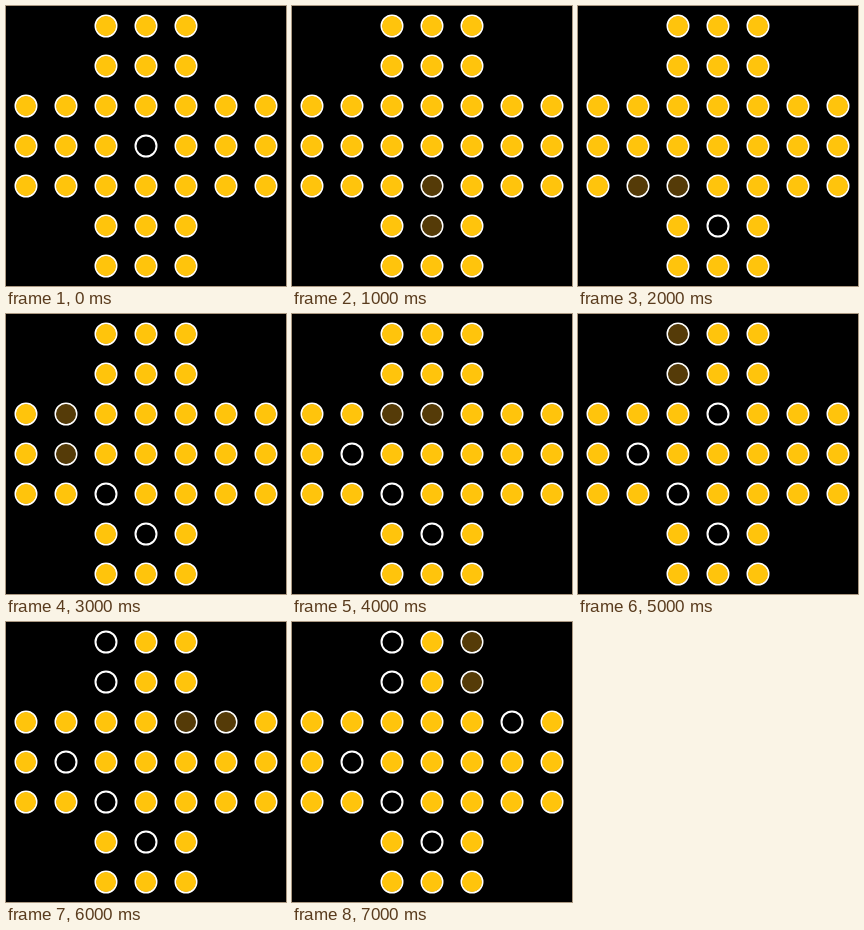
An HTML page with a canvas that plays this animation: 280x280 px, repeating every 8000 ms.

```html
<!DOCTYPE html>
<html lang="en">
<head>
<meta charset="utf-8">
<title>Peg solitaire</title>
<style>
  html, body { margin: 0; width: 100%; height: 100%; overflow: hidden; background: #000; }
  canvas { display: block; }
</style>
</head>
<body>
<canvas id="board" width="280" height="280"></canvas>
<script>
const ctx = document.getElementById('board').getContext('2d');
const SIZE = 7, CELL = 40, STEP = 1000;
const GOLD = '#ffc40c', DIM = '#553b08';

// Each move: start column, row, and jump direction
const moves = [
  [3, 5, 0, -1], [1, 4, 1, 0], [1, 2, 0, 1], [3, 2, -1, 0],
  [2, 0, 0, 1], [5, 2, -1, 0], [4, 0, 0, 1]
];

const key = (col, row) => row * SIZE + col;
const onBoard = (col, row) => Math.abs(col - 3) < 2 || Math.abs(row - 3) < 2;

// Replay the first `count` moves; the pegs leaving in the last one are dimmed
function boardAfter(count) {
  const empty = new Set([key(3, 3)]);
  let leaving = [];
  for (const [col, row, dx, dy] of moves.slice(0, count)) {
    leaving = [key(col, row), key(col + dx, row + dy)];
    leaving.forEach(hole => empty.add(hole));
    empty.delete(key(col + 2 * dx, row + 2 * dy));
  }
  return { empty, leaving };
}

function drawHole(x, y, fill) {
  ctx.beginPath();
  ctx.arc(x, y, 10.5, 0, 2 * Math.PI);
  ctx.strokeStyle = '#fff';
  ctx.lineWidth = 2;
  ctx.stroke();
  if (!fill) return;
  ctx.beginPath();
  ctx.arc(x, y, 10, 0, 2 * Math.PI);
  ctx.fillStyle = fill;
  ctx.fill();
}

function draw() {
  const count = Math.floor(performance.now() / STEP) % (moves.length + 1);
  const { empty, leaving } = boardAfter(count);
  ctx.fillStyle = '#000';
  ctx.fillRect(0, 0, 280, 280);
  for (let row = 0; row < SIZE; row++) {
    for (let col = 0; col < SIZE; col++) {
      if (!onBoard(col, row)) continue;
      const hole = key(col, row);
      const fill = leaving.includes(hole) ? DIM : empty.has(hole) ? null : GOLD;
      drawHole((col + 0.5) * CELL, (row + 0.5) * CELL, fill);
    }
  }
  requestAnimationFrame(draw);
}
draw();
</script>
</body>
</html>
```
